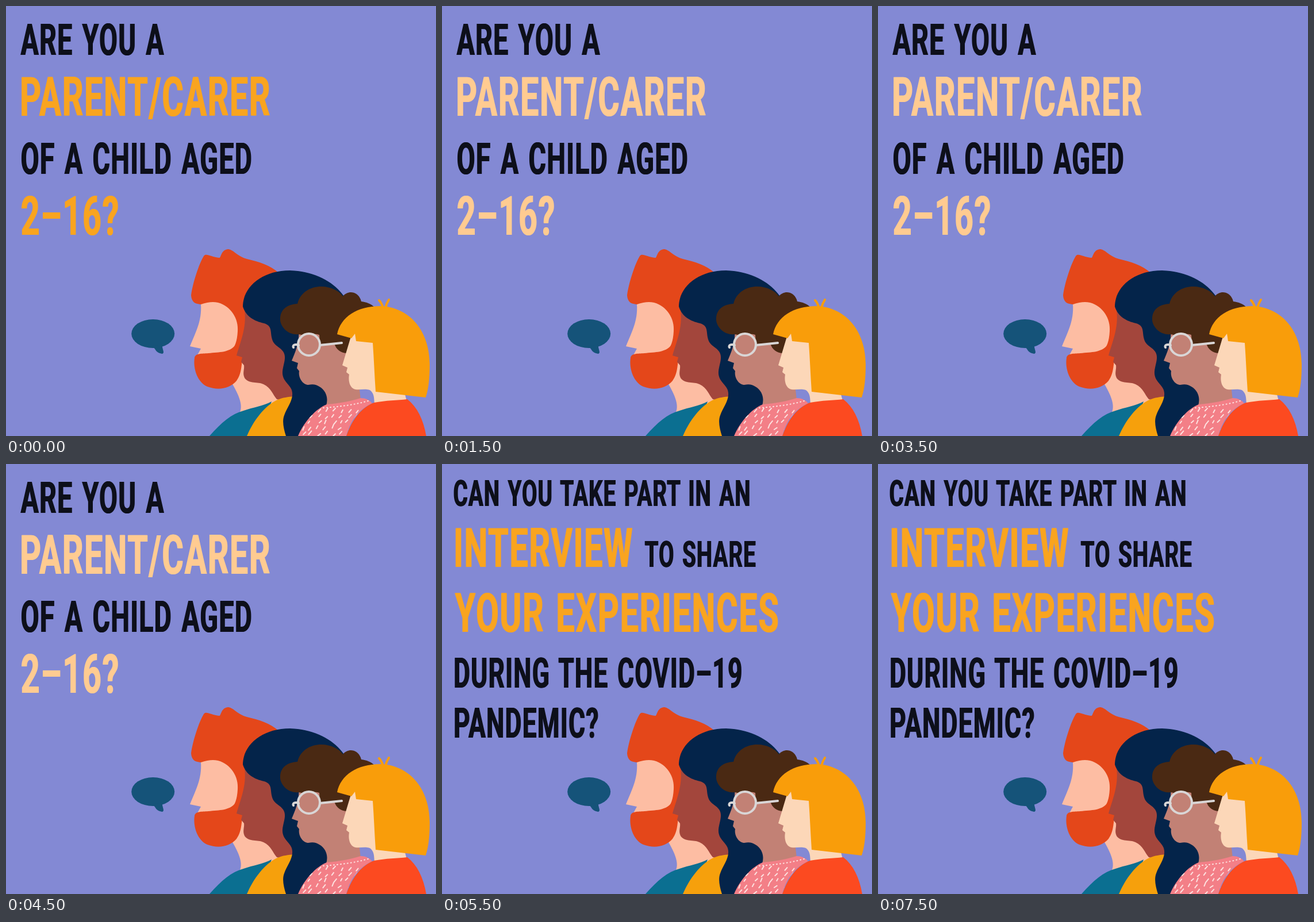
These frames come from a looping animation (748 by 748 pixels, 8000 ms). An HTML page:

```html
<!DOCTYPE html>
<html lang="en">
<head>
<meta charset="utf-8">
<title>Parent and carer interviews</title>
<style>
  html, body { margin: 0; width: 100%; height: 100%; overflow: hidden; background: #8389d4; }
  svg { display: block; width: 100%; height: 100%; }
  text {
    font-family: Roboto, "Liberation Sans", sans-serif; font-weight: 700; fill: #0d0f1a;
    letter-spacing: 0.03em; word-spacing: 0.07em;
  }
  .accent { fill: var(--accent); }
</style>
</head>
<body>
<svg id="stage" viewBox="0 0 748 748">
  <defs>
    <clipPath id="blouse">
      <path id="blouseShape" d="M508 748C519 722 540 700 558 693C580 691 602 687 617 682C625 682 632 685 637 691C615 701 599 720 592 748Z"/>
    </clipPath>
  </defs>
  <rect width="748" height="748" fill="#8389d4"/>

  <g id="bubble" fill="#155379">
    <ellipse cx="255.700" cy="570" rx="37.500" ry="25"/>
    <path d="M254 592C262 597 259 603 272 605C277 603 271 597 272 589Z"/>
  </g>

  <g id="beardedMan">
    <path fill="#e4471a" d="M322 503C325 481 336 448 344 435C348 429 357 437 371 438C374 439 374 423 387 423C397 425 402 435 419 440C440 445 460 451 474 464L455 600L412 625L396 600L339 519C332 518 323 518 322 503Z"/>
    <path fill="#fdbda3" d="M339 519C351 515 360 514 369 516C391 522 405 544 403 566C402 584 398 593 392 599L350 612L333 607L339 596L320 592C330 567 341 548 339 519Z"/>
    <path fill="#fdbda3" d="M393 656L409 608L465 645L474 684L452 705L404 712C415 697 405 677 393 656Z"/>
    <path fill="#e4471a" d="M328 612C329 604 340 605 352 604C372 602 388 603 399 590L413 600C409 624 411 638 401 652C389 666 369 669 350 662C334 655 325 632 328 612Z"/>
    <path fill="#0b6f91" d="M354 748C374 725 393 709 413 704C430 698 447 696 462 688L440 748Z"/>
  </g>

  <g id="longHair">
    <path fill="#a3463c" d="M415 530C419 560 407 586 401 608L411 611L409 619L414 625C415 633 411 638 415 647C423 658 438 653 448 658C461 664 464 676 471 684L505 692L500 560Z"/>
    <path fill="#f6a00c" d="M419 748C430 722 449 696 472 685C482 681 490 680 502 679L500 748Z"/>
    <path fill="#04244a" d="M412 523C412 489 445 460 494 460C535 461 570 479 588 505L600 700L570 748H487C483 735 480 722 484 712C489 697 502 684 497 668C493 657 480 652 481 636C482 623 489 611 482 601C475 591 465 592 462 576C460 564 462 556 449 552C432 548 418 541 412 523Z"/>
  </g>

  <g id="curlyHair">
    <path fill="#c28175" d="M509 565C511 583 504 601 497 617L508 621L506 630L510 635C508 646 516 659 526 659C535 657 540 659 545 662C557 669 561 682 557 695L590 702L617 685L613 650L620 570Z"/>
    <path fill="#4a2913" d="M477 547C476 529 488 519 507 518C511 500 528 488 548 488C566 488 580 496 586 505C596 493 614 497 618 514C627 515 635 518 641 524L625 570L594 604C582 604 574 597 571 587L546 588L545 572C535 568 524 575 509 571C493 573 479 561 477 547Z"/>
    <g fill="none" stroke="#d9d6d6" stroke-width="4" stroke-linecap="round">
      <circle cx="527" cy="589" r="19"/>
      <path d="M509 590C502 587 498 591 500 594M546 590L584 586"/>
    </g>
    <use href="#blouseShape" fill="#f37f87"/>
    <g id="flecks" clip-path="url(#blouse)" fill="none" stroke="#fde1df" stroke-width="2" stroke-linecap="round"></g>
  </g>

  <g id="bob">
    <path fill="#fcd7b8" d="M600 575L585 625L594 629L592 637L597 641C595 652 598 665 608 667C619 668 631 664 636 671C641 677 640 684 641 692L665 705L697 687L690 660L650 570L606 569Z"/>
    <path fill="#f99d0a" d="M576 571C582 541 611 522 651 522C704 524 737 567 737 623C737 648 735 667 730 681L643 671C641 643 640 614 638 586L609 583L607 570L601 578Z"/>
    <path fill="none" stroke="#f99d0a" stroke-width="4" stroke-linecap="round" d="M656 525Q653 516 649 512M660 525Q662 517 666 511"/>
    <path fill="#fc4a20" d="M592 748C603 716 620 698 640 690C661 686 681 686 698 684C715 697 726 719 731 748Z"/>
  </g>

  <g id="question"></g>
  <g id="invitation"></g>
</svg>
<script>
const SVG_NS = "http://www.w3.org/2000/svg";
const LOOP = 8000, BEAT = 500;
const CONDENSE = 0.605;
const byId = id => document.getElementById(id);
const ORANGE = "#f9a41f", PALE = "#ffcb91";

function add(parent, tag, attrs, content = "") {
  const node = document.createElementNS(SVG_NS, tag);
  for (const key in attrs) node.setAttribute(key, attrs[key]);
  node.textContent = content;
  return parent.appendChild(node);
}

// A second copy set slightly to the right thickens the upright strokes.
function writeLines(group, lines) {
  const block = add(group, "g", { id: group.id + "Lines" });
  for (const [x, y, size, content, accent] of lines) {
    add(block, "text", {
      transform: `translate(${x} ${y}) scale(${CONDENSE} 1)`,
      "font-size": size,
      class: accent ? "accent" : "plain"
    }, content);
  }
  add(group, "use", { href: "#" + block.id, x: 1.2 });
}

function scatterFlecks() {
  let seed = 7;
  const random = () => (seed = seed * 16807 % 2147483647) / 2147483647;
  let path = "";
  for (let y = 704; y < 750; y += 10) {
    for (let x = 512; x < 632; x += 13) {
      const left = x + random() * 7, top = y + random() * 4;
      path += `M${left} ${top}l${2 + random() * 3} ${-3 - random() * 3}`;
    }
  }
  add(byId("flecks"), "path", { d: path });
  add(byId("flecks"), "path", { d: "M552 699C580 697 605 694 630 687", "stroke-dasharray": "1 5" });
}

const question = byId("question"), invitation = byId("invitation");

writeLines(question, [
  [25, 85, 76.5, "ARE YOU A"],
  [23.5, 191, 94.5, "PARENT/CARER", true],
  [25, 292, 76.5, "OF A CHILD AGED"],
  [25, 398, 95, "2–16?", true]
]);
writeLines(invitation, [
  [19, 73, 63.5, "CAN YOU TAKE PART IN AN"],
  [19.5, 179, 95, "INTERVIEW", true],
  [352, 179, 63.5, "TO SHARE"],
  [22, 292, 95, "YOUR EXPERIENCES", true],
  [19.5, 389, 73, "DURING THE COVID–19"],
  [19.5, 476, 73, "PANDEMIC?"]
]);
scatterFlecks();

function render(time) {
  const beat = Math.floor(time % LOOP / BEAT);
  const asking = beat < 10, inviting = beat > 10;
  question.style.display = asking ? "" : "none";
  invitation.style.display = inviting ? "" : "none";
  const bright = (beat % 2 === 0) === asking;
  byId("stage").style.setProperty("--accent", bright ? ORANGE : PALE);
}

const start = performance.now();
function tick() {
  render(performance.now() - start);
  requestAnimationFrame(tick);
}
tick();
</script>
</body>
</html>
```
